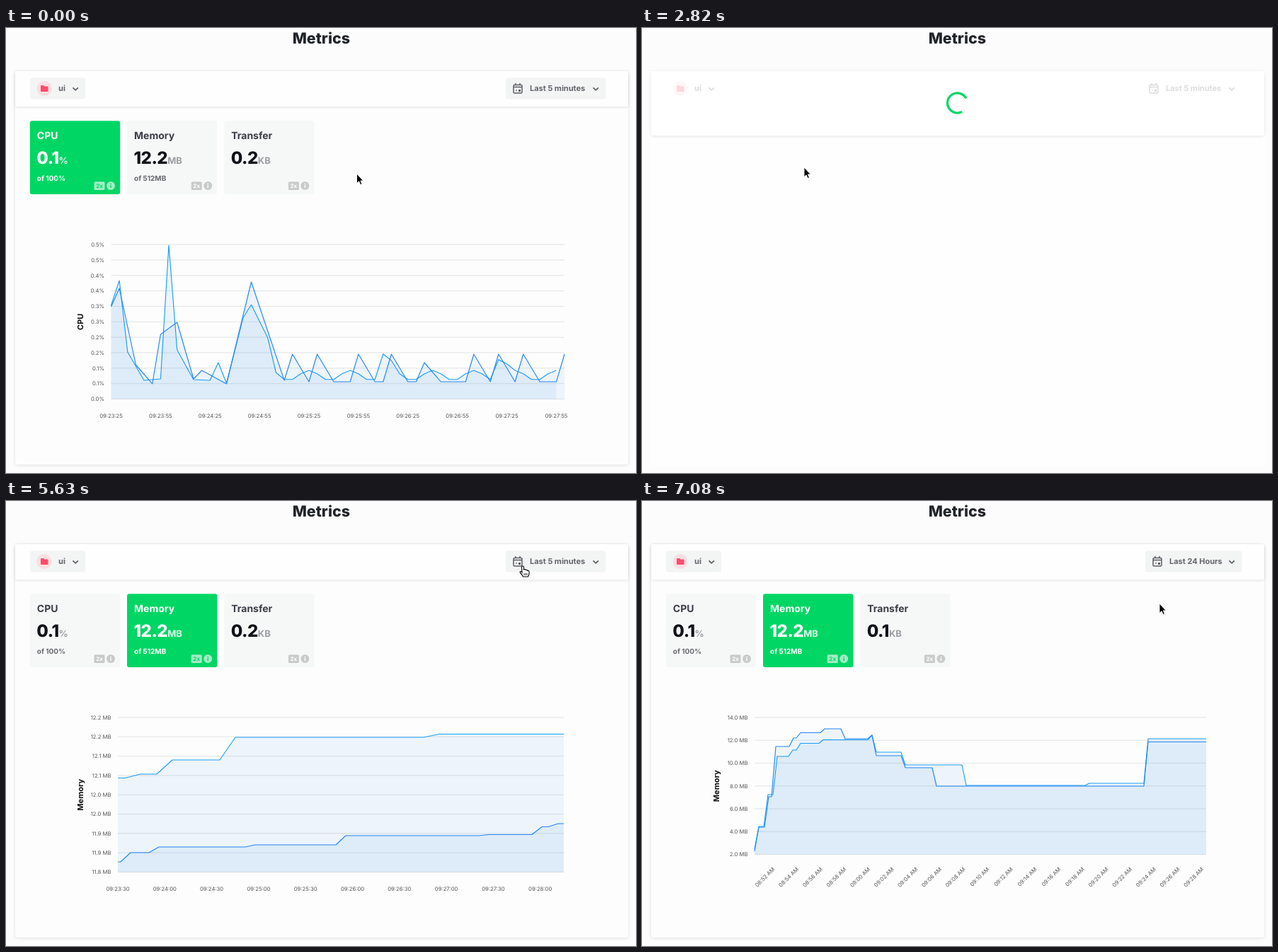
An HTML page that plays this animation: 890 px wide and 629 px high, repeating every 8000 ms.

```html
<!DOCTYPE html>
<html lang="en">
<head>
<meta charset="utf-8">
<title>Metrics</title>
<style>
  html, body { margin: 0; width: 100%; height: 100%; overflow: hidden; background: #fcfcfc; }
  svg { display: block; width: 890px; height: 629px; font-family: Inter, Roboto, sans-serif; font-weight: 700; text-rendering: geometricPrecision; }
  .shadow { filter: drop-shadow(0 1px 2px rgba(0, 0, 0, .11)); }
  .axis { font-size: 7.7px; font-weight: 400; fill: #555; }
</style>
</head>
<body>
<svg id="stage" viewBox="0 0 890 629"></svg>
<script>
const LOOP = 8000, GREEN = '#00d664', LIGHT = '#1b9ff6', DARK = '#2485f5';

const rect = (x, y, w, h, fill, extra = '') =>
  `<rect x="${x}" y="${y}" width="${w}" height="${h}" fill="${fill}" ${extra}/>`;
const text = (x, y, s, size, fill, extra = '') =>
  `<text x="${x}" y="${y}" font-size="${size}" fill="${fill}" ${extra}>${s}</text>`;
const axisText = (x, y, s, extra) => `<text class="axis" x="${x}" y="${y}" ${extra}>${s}</text>`;
const times = (n, fn) => Array.from({ length: n }, (_, i) => fn(i));
const two = n => String(n).padStart(2, '0');

// Height at sample i: straight between key points, then the idle rule
function sampler(keys, idle) {
  return i => {
    const k = keys.findIndex(([at]) => at >= i);
    if (k < 0) return idle(i);
    if (k === 0) return keys[0][1];
    const [x0, y0] = keys[k - 1], [x1, y1] = keys[k];
    return y0 + (y1 - y0) * (i - x0) / (x1 - x0);
  };
}

// 1 at each peak; rises over one sample, falls over two
const pulse = (i, peaks) => Math.max(0, ...peaks.map(at => 1 - (i < at ? at - i : (i - at) / 2)));

const cpuLight = sampler(
  [[0, 392], [1, 357], [2, 458], [4, 498], [6, 496], [7, 307], [8, 455], [10, 497], [12, 498],
    [13, 473], [14, 502], [16, 410], [17, 391], [19, 438], [20, 487]],
  i => 491 - 7 * Math.cos((i - 24) * Math.PI / 2.5) - 28 * pulse(i, [33, 47]));
const cpuDark = sampler(
  [[0, 394], [1, 368], [3, 476], [5, 503], [6, 433], [8, 416], [10, 496], [11, 484], [14, 503],
    [17, 359], [21, 498]],
  i => 500 - 39 * pulse(i, [22, 25, 30, 34, 38, 44, 47, 50, 55, 58]) + 12 * pulse(i, [38]));

// Level line: each step leaves the last level at x and reaches y after the ramp
function levels(start, end, y0, ramp, steps) {
  const points = [[start, y0]];
  let level = y0;
  for (const [x, y] of steps) {
    points.push([x, level], [x + ramp, y]);
    level = y;
  }
  return [...points, [end, level]];
}

function series(points, base, color) {
  const line = points.map(p => p.map(v => +v.toFixed(1)).join()).join(' ');
  const first = points[0][0], last = points.at(-1)[0];
  return `<polygon points="${first},${base} ${line} ${last},${base}" fill="#0b74de" opacity=".062"/>
    <polyline points="${line}" fill="none" stroke="${color}" stroke-width="1.15" stroke-linejoin="round"/>`;
}

function chart({ title, left, right, bottom, labels, light, dark, xLabels }) {
  const gap = (bottom - 306) / (labels.length - 1), mid = (306 + bottom) / 2;
  return labels.map((s, i) => {
    const y = 306 + i * gap;
    return rect(left, y - .6, right - left, 1.2, '#e5e7e9') +
      axisText(left - 9.5, y + 2.8, s, 'text-anchor="end"');
  }).join('') +
    series(light, bottom, LIGHT) + series(dark, bottom, DARK) + xLabels.join('') +
    text(0, 4, title, 11, '#111', `text-anchor="middle" transform="translate(105 ${mid})rotate(-90)"`);
}

// Clock labels every 30 s, starting the given seconds after 09:23
const clockLabels = (x, step, first) => times(10, i => {
  const s = first + i * 30;
  return axisText(x + i * step, 551, `09:${two(23 + Math.floor(s / 60))}:${two(s % 60)}`, 'text-anchor="middle"');
});

// One sample every 5 s
function cpuChart(first, last, right, lightLast) {
  const left = 148.5, step = (right - left) / (last - first);
  const place = (sample, end) => times(end - first + 1, i => [left + i * step, sample(first + i)]);
  return chart({
    title: 'CPU', left, right, bottom: 524.5,
    labels: times(11, i => `0.${Math.ceil((10 - i) / 2)}%`),
    light: place(cpuLight, lightLast), dark: place(cpuDark, last),
    xLabels: clockLabels(left, step * 6, 25 + first * 5)
  });
}

const charts = {
  cpuEarly: cpuChart(0, 55, 789, 54),
  cpuLate: cpuChart(1, 58, 788, 58),
  memory: chart({
    title: 'Memory', left: 158, right: 788, bottom: 524.5,
    labels: times(9, i => `${((118 + Math.ceil((8 - i) / 2)) / 10).toFixed(1)} MB`),
    light: levels(158, 788, 391.5, 22, [[168, 386], [213, 366], [302, 334], [590, 329.5]]),
    dark: levels(158, 788, 510, 14,
      [[162, 497], [202, 489], [338, 486], [466, 473], [668, 471.5], [743, 460.5], [766, 456]]),
    xLabels: clockLabels(158, 66.3, 30)
  }),
  day: chart({
    title: 'Memory', left: 159, right: 797, bottom: 499.5,
    labels: times(7, i => `${14 - i * 2}.0 MB`),
    light: levels(159, 797, 492, 6, [[159, 460], [172, 415], [185, 361], [207, 352], [218, 342.5],
      [250, 337.5], [319, 331], [325, 355], [366, 373], [452, 402], [626, 399], [709, 336]]),
    dark: levels(159, 797, 495, 6, [[159, 461], [173, 418], [183, 347], [208, 335], [218, 327.5],
      [252, 322], [281, 336], [319, 331], [325, 360], [366, 377], [410, 403], [709, 340.5]]),
    xLabels: times(19, i => {
      const m = 52 + i * 2, label = `${two(8 + Math.floor(m / 60))}:${two(m % 60)} AM`;
      return axisText(0, 0, label, `text-anchor="end" transform="translate(${188 + i * 33.65} 521)rotate(-45)"`);
    })
  })
};

const chevron = x => `<path d="M${x} 84.3l3.7 3.5 3.7-3.5" fill="none" stroke="#5c5f63" stroke-width="1.8"/>`;

function headerContent(period, leftFill, rightFill) {
  const left = period === 'Last 24 Hours' ? 711 : 706, icon = left + 10;
  return rect(34, 70.5, 78, 30, leftFill, 'rx="3"') +
    '<circle cx="54" cy="85.5" r="10.5" fill="#f9dfe2"/>' +
    '<path d="M49 82q0-1 1-1h3l1.5 1.5h4q1 0 1 1V89q0 1-1 1H50q-1 0-1-1z" fill="#ff4b6b"/>' +
    text(74, 89.3, 'ui', 11.2, '#63666b') + chevron(94.5) +
    rect(left, 70.5, 847.5 - left, 30, rightFill, 'rx="3"') +
    `<g fill="none" stroke="#5c5f63" stroke-width="1.5">
      <rect x="${icon + 1}" y="80.5" width="12" height="11.5" rx="1.5"/>
      <path d="M${icon + 1} 83.5h12M${icon + 4} 78v3M${icon + 10} 78v3"/></g>` +
    rect(icon + 8, 87, 3, 3, '#5c5f63') + rect(icon + 4, 87, 2, 2, '#999') +
    text(left + 34, 89.3, period, 11, '#63666b') + chevron(829.5);
}

const cardLeft = i => 33.8 + i * 137.2;

function card(i, [name, value, unit, limit], selected) {
  const x = cardLeft(i);
  const pick = (on, off) => selected ? on : off;
  const badge = pick('#a0eec4', '#c9cbcb'), mark = pick(GREEN, '#fff');
  return rect(x, 131.3, 127.4, 103.8, pick(GREEN, '#f6f8f8'), 'rx="3"') +
    text(x + 10, 157, name, 14, pick('#fff', '#3b3e45')) +
    text(x + 9.5, 192, `<tspan font-weight="800" letter-spacing="-.5">${value}</tspan>` +
      `<tspan font-size="13" fill="${pick('#e4fbee', '#9c9ea2')}">${unit}</tspan>`, 24, pick('#fff', '#101318')) +
    text(x + 10, 216, limit, 10, pick('#fff', '#666a6e')) +
    rect(x + 90.7, 217.3, 15, 11.7, badge, 'rx="1.5"') +
    text(x + 98.2, 226, '2x', 8, mark, 'text-anchor="middle"') +
    `<circle cx="${x + 114.2}" cy="223" r="6" fill="${badge}"/>` +
    rect(x + 113.5, 219.7, 1.4, 1.5, mark) + rect(x + 113.5, 222, 1.4, 4, mark);
}

const menuItems = ['Last 5 minutes', 'Last 24 Hours', 'Last 30 days'];
function menu(cursorY) {
  const rowTop = i => 106 + i * 30.5;
  const hovered = Math.floor((cursorY - 106) / 30.5);
  return rect(706, 106, 119, 91.5, '#24282e', 'rx="3" class="shadow"') +
    menuItems.map((s, i) => (i === hovered ? rect(706, rowTop(i), 119, 30.5, '#3b3f44') : '') +
      text(716, rowTop(i) + 19, s, 10.7, '#fff')).join('');
}

const arrow = '<path d="M0 0V13.5L3.1 10.7 5.2 15.5 7.4 14.5 5.4 9.9H9.3Z" fill="#000" stroke="#fff" stroke-width=".9"/>';
const hand = `<path d="M-1.5 1.5Q-1.5 0 0 0T1.5 1.5V5Q4 4 4.5 5.5 6.5 5 7 6.5 9 6 9 8V10.5
  Q9 12 7.5 15H.5Q-1 12-3.5 9.5-4.5 8-3 7.5-2 7.5-1 9Z" fill="#fff" stroke="#000" stroke-width="1.1"/>
  <path d="M2 10v3M4 10v3M6 10v3" stroke="#000" stroke-width=".8"/>`;

// Pointer moves in discrete steps, slow at both ends
const moves = [
  { start: 1760, end: 2290, steps: 7, from: [495.5, 206], to: [229, 197] },
  { start: 4970, end: 5630, steps: 8, from: [229.5, 197], to: [730, 92] },
  { start: 5900, end: 6340, steps: 6, from: [730, 92], to: [731, 145] }
];

function cursorAt(t) {
  const move = moves.findLast(m => t >= m.start);
  if (!move) return moves[0].from;
  const { start, end, steps, from, to } = move;
  const interval = (end - start) / (steps - 1);
  const p = Math.min(1, (Math.floor((t - start) / interval + .01) + 1) / steps);
  const a = p ** 1.35, ease = a / (a + (1 - p) ** 1.35);
  return [from[0] + (to[0] - from[0]) * ease, from[1] + (to[1] - from[1]) * ease ** 2];
}

function clickable([x, y], menuOpen) {
  const inside = (left, top, w, h) => x >= left && x <= left + w && y >= top && y <= top + h;
  return [0, 1, 2].some(i => inside(cardLeft(i), 131, 127, 104)) ||
    inside(706, 70.5, 141, 30) || (menuOpen && inside(706, 100, 119, 97));
}

function spinner(elapsed) {
  const angle = 17 + Math.floor(elapsed / 88) * 42;
  return `<path d="M9.9 9.9A14 14 0 1 1 9.9-9.9" transform="translate(445.5 106)rotate(${angle})"
    fill="none" stroke="${GREEN}" stroke-width="3.2"/>`;
}

function render(t) {
  const firstLoad = t >= 2820 && t < 3260, secondLoad = t >= 6690 && t < 7080;
  const loading = firstLoad || secondLoad;
  const menuOpen = t >= 5810 && t < 6690;
  const period = menuItems[t < 6690 ? 0 : 1];
  const cursor = cursorAt(t);
  let body;
  if (loading) {
    body = rect(11, 61, 870, 559, '#fefefe') +
      rect(13, 61, 866, 91, '#fff', 'rx="3" class="shadow"') +
      `<g opacity=".22">${headerContent(period, 'none', 'none')}</g>` +
      spinner(t - (firstLoad ? 2820 : 6690));
  } else {
    const cards = [
      ['CPU', '0.1', '%', 'of 100%'],
      ['Memory', '12.2', 'MB', 'of 512MB'],
      ['Transfer', t < 7080 ? '0.2' : '0.1', 'KB', '']
    ];
    const selected = t < 2820 ? 0 : 1;
    const view = t < 180 ? 'cpuEarly' : t < 2820 ? 'cpuLate' : t < 6690 ? 'memory' : 'day';
    body = rect(13, 61, 866, 556, '#fdfdfd', 'rx="3" class="shadow"') +
      rect(13, 61, 866, 50, '#fefefe', 'rx="3" class="shadow"') +
      headerContent(period, '#f3f4f4', menuOpen ? '#efefef' : '#f3f4f4') +
      cards.map((c, i) => card(i, c, i === selected)).join('') + charts[view] +
      (menuOpen ? menu(cursor[1]) : '');
  }
  const pointer = !loading && t < 7080 && clickable(cursor, menuOpen) ? hand : arrow;
  return text(445.3, 22, 'Metrics', 21.4, '#212429', 'text-anchor="middle" font-weight="800"') + body +
    `<g transform="translate(${cursor})">${pointer}</g>`;
}

const stage = document.getElementById('stage'), begin = performance.now();
let shown = '';
function tick() {
  const next = render((performance.now() - begin) % LOOP);
  if (next !== shown) stage.innerHTML = shown = next;
  requestAnimationFrame(tick);
}
tick();
</script>
</body>
</html>
```
